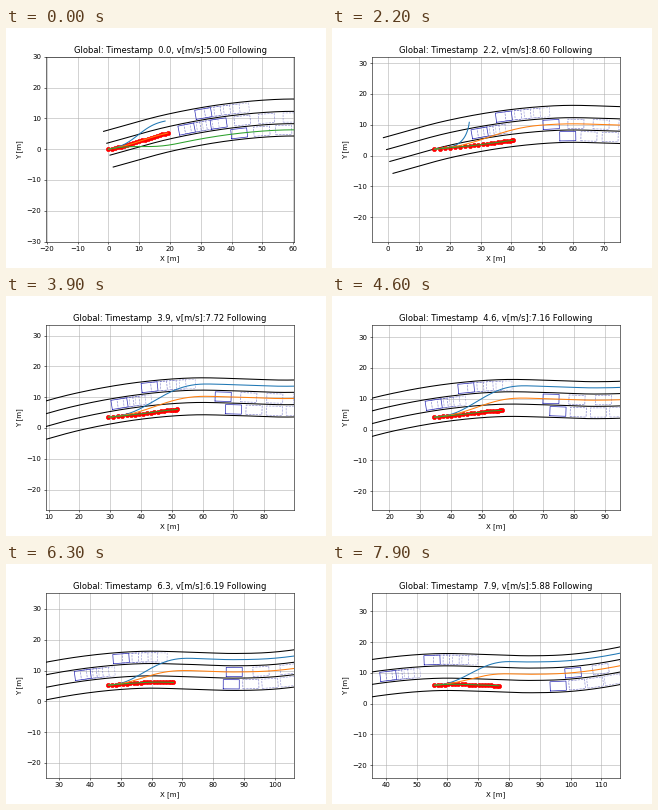
A matplotlib script for the animation above (8 s loop, 320x240 px).

```python
import numpy as np
import matplotlib.pyplot as plt
from matplotlib.animation import FuncAnimation

FRAMES, DT = 80, 0.1
LANES = (4, 0, -4)
COLORS = ("tab:blue", "tab:orange", "tab:green")
T_LAT = 4.0          # duration of a lane change, s
HALF_H = 30.0
HALF_W = HALF_H * (0.775 * 320) / (0.77 * 240)


def hermite(xs, ys, slopes=None):
    """Smooth curve through a few knots."""
    xs, ys = np.array(xs, float), np.array(ys, float)
    m = np.gradient(ys, xs) if slopes is None else np.array(slopes, float)

    def curve(x):
        i = np.clip(np.searchsorted(xs, x, side="right") - 1, 0, len(xs) - 2)
        h = xs[i + 1] - xs[i]
        u = (x - xs[i]) / h
        return (ys[i] * (1 + 2 * u) * (1 - u) ** 2
                + ys[i + 1] * u * u * (3 - 2 * u)
                + h * u * (1 - u) * (m[i] * (1 - u) - m[i + 1] * u))
    return curve


road = hermite([0, 20, 40, 57, 72, 87, 100, 115, 130],
               [0, 5.4, 8.9, 10.25, 10.0, 9.55, 10.0, 12.1, 15.7])

TIMES = [0, 1.2, 2.2, 3.9, 5.3, 6.3, 7.9]
SPEEDS = [5.00, 6.98, 8.60, 7.72, 6.63, 6.19, 5.88]
speed = hermite(TIMES, SPEEDS)
ego_x = hermite(TIMES, [0, 6.75, 15.0, 29.4, 39.4, 46.0, 55.8], SPEEDS)
ego_y = hermite(TIMES, [0, 1.07, 2.05, 3.5, 4.53, 5.25, 6.0])

# lane offset, start, speed, half acceleration
CARS = [(4, 31.5, 3.0, 0.0), (0, 25.4, 1.95, 0.0),
        (0, 35.8, 7.6, 0.08), (-4, 42.0, 7.6, -0.1)]


def heading(s):
    return np.arctan((road(s + 0.05) - road(s - 0.05)) / 0.1)


def to_xy(s, d):
    s = np.clip(s, 0, 130)
    a = heading(s)
    return s - d * np.sin(a), road(s) + d * np.cos(a)


def to_sd(x, y):
    s = x
    for _ in range(6):
        a = heading(s)
        d = (y - road(s)) / np.cos(a)
        s = x + d * np.sin(a)
    return s, d


def ego_sd(t):
    return to_sd(ego_x(t), ego_y(t))


def follow_length(lane, t):
    """Length of a car-following path, or None for velocity keeping."""
    if lane == 4:
        return np.interp(t, [0, 1.2, 2.2], [19.3, 16.4, 12.6]) if t < 2.85 else None
    if lane == 0:
        return 19.3 - 0.4 * t if t < 1.65 else None
    if t < 1.75:
        return None
    return np.interp(t, [2.2, 3.9, 5.3, 7.9], [25.6, 22.8, 21.9, 21.3])


def candidate(lane, t, step):
    s0, d0 = ego_sd(t)
    s1, d1 = ego_sd(t + 0.05)
    v, dv = speed(t), (d1 - d0) / 0.05
    length = follow_length(lane, t)
    tau = np.arange(0, (12 if length is None else T_LAT) + step / 2, step)
    u = np.clip(tau / T_LAT, 0, 1)
    d = (d0 + dv * T_LAT * (u - 6 * u**3 + 8 * u**4 - 3 * u**5)
         + (lane - d0) * u**3 * (10 - 15 * u + 6 * u * u))
    if length is None:
        s = v * tau + 0.2 * tau**2
    elif v * T_LAT > length:
        s = length * (1 - (1 - u) ** (v * T_LAT / length))
    else:
        s = v * tau + (length - v * T_LAT) * u * u
    return to_xy(s0 + s, d)


def draw_car(s, d, **style):
    x, y = to_xy(s, d)
    a = heading(min(s, 129))
    px = 2.6 * np.array([-1, 1, 1, -1, -1])
    py = 1.5 * np.array([-1, -1, 1, 1, -1])
    ax.plot(x + px * np.cos(a) - py * np.sin(a),
            y + px * np.sin(a) + py * np.cos(a), **style)


fig, ax = plt.subplots(figsize=(6.4, 4.8), dpi=50)


def update(k):
    t = k * DT
    ax.cla()
    s = np.linspace(0, 130, 261)
    for d in (-6, -2, 2, 6):
        ax.plot(*to_xy(s, d), "k", lw=1.5)

    for d, start, v, acc in CARS:
        for ahead in range(5):
            tt = t + ahead
            pos = start + v * tt + acc * tt * tt
            if pos > 128:
                continue
            if ahead == 0:
                draw_car(pos, d, color="#2a2ab4", lw=1)
            else:
                draw_car(pos, d, color="#5050b8", lw=0.9, ls="--",
                         alpha=0.85 - 0.1 * ahead)

    best = 0 if t < 0.35 else -4
    ax.plot(*candidate(best, t, 0.2), "-or")
    for lane, color in zip(LANES, COLORS):
        ax.plot(*candidate(lane, t, 0.05), color=color, lw=1.5)

    x, y = ego_x(t), ego_y(t)
    ax.set_xlim(x + 20 - HALF_W, x + 20 + HALF_W)
    ax.set_ylim(y - HALF_H, y + HALF_H)
    ax.set_xlabel("X [m]")
    ax.set_ylabel("Y [m]")
    mode = "VelocityKeeping" if follow_length(best, t) is None else "Following"
    ax.set_title(f"Global: Timestamp {t:4.1f}, v[m/s]:{speed(t):.2f} {mode}")
    ax.grid(True)


anim = FuncAnimation(fig, update, frames=FRAMES, interval=100,
                     init_func=lambda: None, repeat=True, repeat_delay=0)
plt.show()
```
